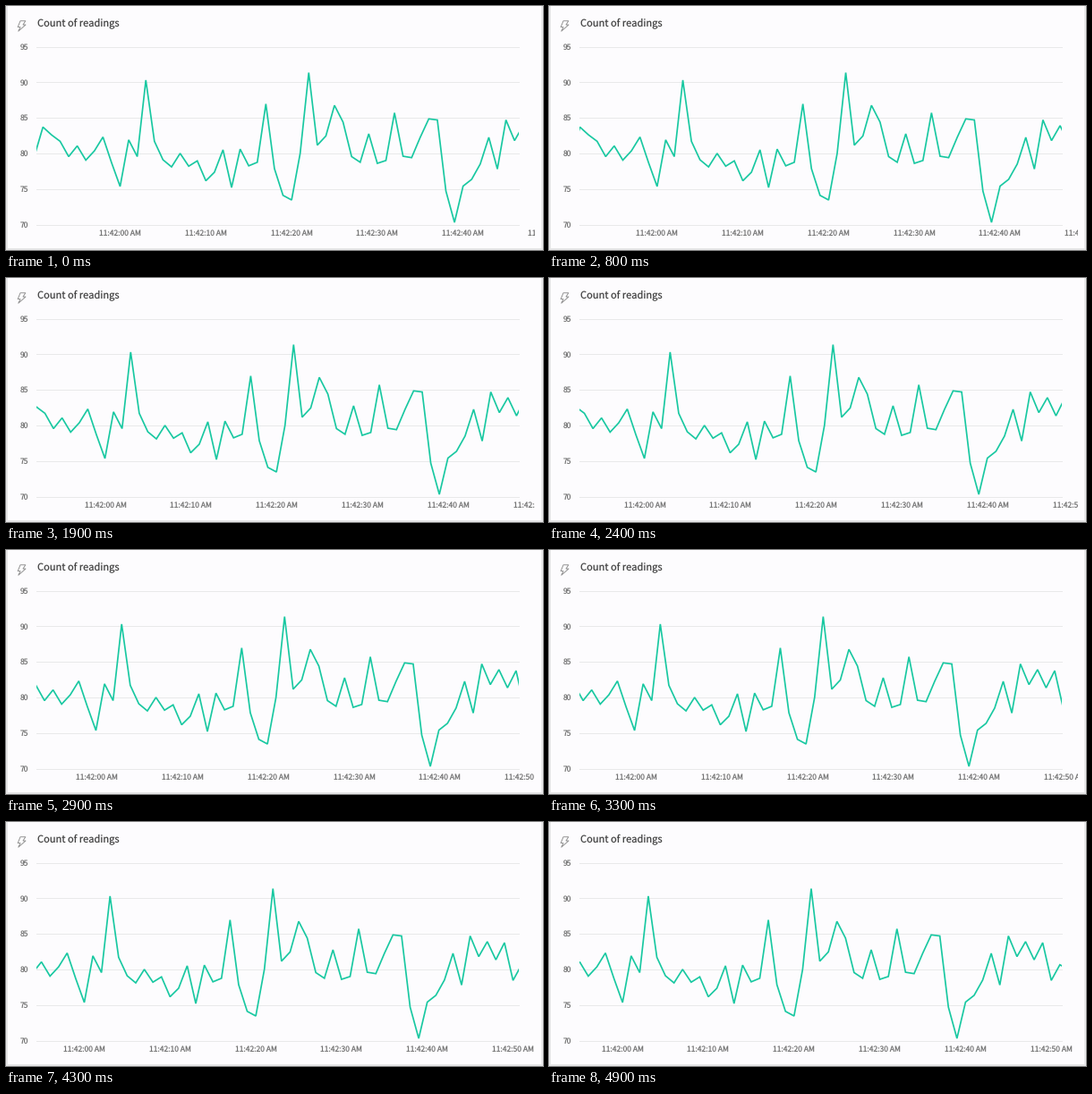
A matplotlib script for the animation above (5000 ms loop, 600 by 273 pixels).

```python
import numpy as np
import matplotlib.pyplot as plt
from matplotlib.animation import FuncAnimation
from matplotlib.patches import Polygon, Rectangle

W, H, DPI = 600, 273, 100
FRAMES, STEP_MS = 50, 100
LEFT, RIGHT, LABEL_RIGHT = 33.5, 572.5, 591
TOP, BOTTOM = 45.5, 244.5
ZERO_X, SECOND = 127.5, 9.58  # start x of 11:42:00 and pixels per second

plt.rcParams["font.family"] = "Noto Sans CJK JP"
plt.rcParams["text.hinting"] = "none"

# One reading per second, from 11:41:50 on
READINGS = np.array([
    79.6, 83.7, 82.6, 81.7, 79.55, 81.05, 79.05, 80.35, 82.3, 78.7,
    75.35, 81.9, 79.55, 90.3, 81.7, 79.1, 78.1, 80.0, 78.2, 78.95,
    76.15, 77.35, 80.5, 75.2, 80.6, 78.25, 78.75, 86.95, 77.85, 74.1,
    73.45, 80.0, 91.35, 81.15, 82.45, 86.75, 84.4, 79.55, 78.75, 82.75,
    78.6, 79.0, 85.7, 79.6, 79.4, 82.25, 84.85, 84.7, 74.7, 70.3,
    75.4, 76.35, 78.5, 82.25, 77.8, 84.7, 81.8, 83.9, 81.35, 83.75,
    78.45, 80.65, 80.0])
SECONDS = np.arange(len(READINGS)) - 10

# Uneven scrolling: time in seconds against pixels moved left
TIMES = [0, 0.8, 1.4, 2.4, 3.3, 3.9, 4.0, 4.3, 4.9]
LINE_SHIFT = [0, 6.7, 13, 20.9, 31.9, 37.2, 37.2, 40, 45.3]
LABEL_SHIFT = [0, 6.8, 12.5, 20.5, 30, 37.2, 37.2, 40, 45.4]


def value_y(value):
    return BOTTOM - (value - 70) * (BOTTOM - TOP) / 25


def px(size):
    return size * 72 / DPI


fig = plt.figure(figsize=(W / DPI, H / DPI), dpi=DPI, facecolor="#fdfcfe")
ax = fig.add_axes([0, 0, 1, 1])
ax.set_xlim(0, W)
ax.set_ylim(H, 0)
ax.axis("off")


def box(x, y, w, h, color):
    ax.add_patch(Rectangle((x, y), w, h, color=color, lw=0))


def clip_to(artist, x0, x1):
    artist.set_clip_path(Rectangle((x0, 0), x1 - x0, H, transform=ax.transData))


# Card edges
box(0, 0, 1.5, H, "#e6e6e7")
box(598, 0, 2, H, "#e9e9ea")
box(0, 271, W, 2, "#e6e6e7")

# Title with bolt icon
bolt = [(16, 16.7), (21.8, 16.7), (19, 21), (22, 21),
        (13.8, 28.2), (16, 23.6), (13.2, 23.6)]
ax.add_patch(Polygon(bolt, fill=False, ec="#8c8c8c", lw=px(0.9), joinstyle="round"))
ax.text(35, 23, "Count of readings", size=px(11.1), color="#454545",
        va="baseline")

# Value axis
for value in range(70, 100, 5):
    y = value_y(value)
    ax.plot([LEFT, RIGHT], [y, y], color="#e9e9ea", lw=px(1))
    ax.text(25.5, y + 3.2, str(value), size=px(8.5), color="#777777",
            ha="right", va="baseline")

line, = ax.plot([], [], color="#18c8a1", lw=px(1.7),
                solid_joinstyle="miter", solid_capstyle="butt")
clip_to(line, LEFT, RIGHT)

labels = []
for sec in range(0, 60, 10):
    label = ax.text(0, 257.2, f"11:42:{sec:02d} AM", size=px(8.5), color="#777777",
                    ha="center", va="baseline", clip_on=True)
    clip_to(label, 0, LABEL_RIGHT)
    labels.append((sec, label))


def update(frame):
    t = frame * STEP_MS / 1000
    line.set_data(ZERO_X + SECONDS * SECOND - np.interp(t, TIMES, LINE_SHIFT),
                  value_y(READINGS))
    shift = np.interp(t, TIMES, LABEL_SHIFT)
    for sec, label in labels:
        label.set_x(ZERO_X + sec * SECOND - shift)
    return [line] + [label for _, label in labels]


anim = FuncAnimation(fig, update, frames=FRAMES, interval=STEP_MS,
                     repeat=True, repeat_delay=0)
plt.show()
```
